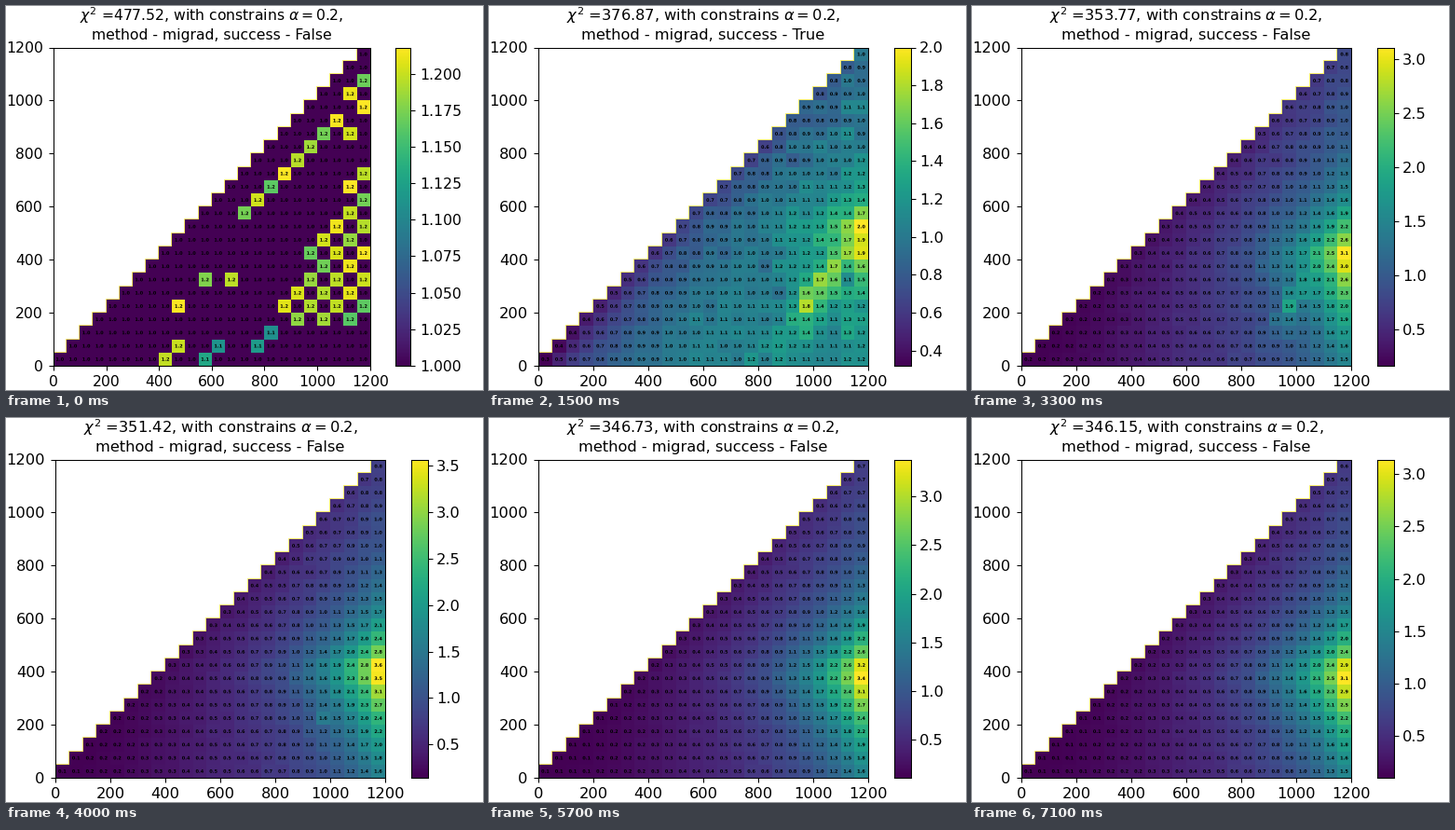
Write a matplotlib script that moves like this. It is 512x412 px and loops after 7.2 s.

```python
import numpy as np
import matplotlib.pyplot as plt
from matplotlib.animation import FuncAnimation
from matplotlib.collections import PathCollection
from matplotlib.textpath import TextPath
from matplotlib.ticker import MaxNLocator
from matplotlib.transforms import Affine2D, IdentityTransform

W, H, DPI = 512, 412, 100
FRAMES, INTERVAL = 72, 100
N, BIN = 24, 50
TOP, BOTTOM = 44.5, 386
RAMP = 15  # frames until the flat start has turned into a smooth fit

plt.rcParams["font.family"] = "DejaVu Sans"

# Key points of the fit; values between them are interpolated.
KEYS = [0, 15, 22, 33, 40, 57, 71]
CHI2 = [477.52, 376.87, 365.75, 353.77, 351.42, 346.73, 346.15]
PEAK = [2.0, 2.0, 2.465, 3.11, 3.57, 3.38, 3.14]
CHI2_FLOOR = 345

J, I = np.mgrid[0:N, 0:N]
INSIDE = J <= I
U = I / (N - 1)
RNG = np.random.default_rng(4)
NOISE = RNG.normal(size=(N, N)) * U


def start_field():
    """Flat field with a raised checker patch, a diagonal band and strays."""
    odd = (I + J) % 2 == 1
    patch = odd & (J > 2) & (I > 16.6 + .6 * np.abs(J - 4.5))
    band = ((I - J == 3) & (I > 13) & (I < 22)) | ((I - J == 2) & (I > 21))
    raised = patch | band
    for i, j in [(8, 0), (11, 0), (9, 1), (12, 1), (15, 1), (16, 2),
                 (9, 4), (11, 6), (13, 6), (22, 17), (23, 19)]:
        raised[j, i] = True
    height = .18 + RNG.uniform(-.02, .04, (N, N)) - .08 * ((J < 3) & (I > 10))
    return 1 + raised * height


def fit_field(n):
    """Slope away from the diagonal, a peak at the right, a fading ridge."""
    t = n - RAMP
    lo = .093 + .227 * np.exp(-t / 16)
    hi = np.interp(n, KEYS, PEAK)
    plateau = 1.08 - .33 * t / 56
    settle = np.exp(-t / 10)

    rise = 1 - np.exp(-(.0525 * I + .175 * np.maximum(I - J, 0)))
    base = lo + (plateau - lo) * rise * U ** (1.3 * (1 - settle))

    size = 3.8 - 1.5 * settle
    dy = J - (7.1 + 2.4 * np.exp(-t / 14))
    dist = N - 1 - I + np.maximum(dy - .5, 0) + np.maximum(-dy - .5, 0) / 1.5
    peak = np.exp(-dist / size)

    off_line = np.abs(J - 4.2 - 1.25 * (I - 19)) / 1.8
    ridge = np.exp(-off_line - np.maximum(19 - I, 0) / 1.3)
    ridge *= .8 / (1 + np.exp((n - 38) / 6))

    field = base + (hi - plateau) * np.maximum(peak, ridge)
    field += (.015 + .055 * np.exp(-t / 20)) * NOISE
    inner = field[INSIDE]
    return lo + (field - inner.min()) * (hi - lo) / np.ptp(inner)


START = start_field()


def field_at(n):
    ease = 1 - (1 - min(n / RAMP, 1)) ** 2
    return (1 - ease) * START + ease * fit_field(max(n, RAMP))


def chi2_at(n):
    logs = np.log(np.array(CHI2) - CHI2_FLOOR)
    return CHI2_FLOOR + np.exp(np.interp(n, KEYS, logs))


def bar_ticks(lo, hi):
    """Round tick values inside the range and the decimals they need."""
    ticks = MaxNLocator(9, steps=[1, 2, 2.5, 5, 10]).tick_values(lo, hi)
    digits = len(f"{ticks[1] - ticks[0]:.4g}") - 2
    inside = (ticks >= lo - 1e-6) & (ticks <= hi + 1e-6)
    return ticks[inside], digits


label_cache = {}


def label_path(text):
    if text not in label_cache:
        path = TextPath((0, 0), text, size=4.9,
                        prop={"family": "DejaVu Sans", "weight": "bold"})
        box = path.get_extents()
        shift = Affine2D().translate(-(box.x0 + box.x1) / 2,
                                     -(box.y0 + box.y1) / 2)
        label_cache[text] = path.transformed(shift)
    return label_cache[text]


def px_box(left, right):
    return [left / W, 1 - BOTTOM / H, (right - left) / W, (BOTTOM - TOP) / H]


def set_layout(digits):
    """Shrink the plot as the bar labels get longer."""
    scale = 1 - .02 * (digits - 1)
    left, right, size = 53 * scale, 407 * scale, 11.7 * scale
    ax.set_position(px_box(left, right))
    cax.set_position(px_box(435 * scale, 452.5 * scale))
    for a in (ax, cax):
        a.tick_params(labelsize=size)
    for text in title:
        text.set_x((left + right) / 2 / W)
        text.set_fontsize(size)


fig = plt.figure(figsize=(W / DPI, H / DPI), dpi=DPI, facecolor="white")
ax = fig.add_axes(px_box(53, 407))
cax = fig.add_axes(px_box(435, 452.5))

edges = np.arange(N + 1) * BIN
mesh = ax.pcolormesh(edges, edges, np.ma.masked_array(START, ~INSIDE),
                     cmap="viridis", zorder=1)
ax.stairs(edges[1:], edges, baseline=None, color="#f2e44a", linewidth=1.2,
          zorder=.5)
ax.set(xlim=(0, N * BIN), ylim=(0, N * BIN),
       xticks=range(0, 1201, 200), yticks=range(0, 1201, 200))

centers = np.column_stack([I[INSIDE], J[INSIDE]]) * BIN + BIN / 2
labels = PathCollection([label_path("1.0")], offsets=centers,
                        offset_transform=ax.transData,
                        facecolors="black", linewidths=0, zorder=2)
labels.set_transform(IdentityTransform())
ax.add_collection(labels, autolim=False)

bar = cax.imshow(np.linspace(0, 1, 256)[:, None], origin="lower",
                 cmap="viridis", aspect="auto", extent=(0, 1, 0, 1))
cax.set_xticks([])
cax.yaxis.tick_right()

for a in (ax, cax):
    a.tick_params(length=3.3, width=.75, pad=3.6)
    a.spines[:].set_linewidth(.75)
ax.tick_params(axis="y", pad=4.8)

title = [fig.text(.5, 1 - y / H, "", ha="center", va="baseline")
         for y in (16.3, 36.3)]


def update(n):
    field = field_at(n)
    values = field[INSIDE]
    lo, hi = values.min(), values.max()

    mesh.set_array(np.ma.masked_array(field, ~INSIDE))
    mesh.set_clim(lo, hi)
    labels.set_paths([label_path(f"{v:.1f}") for v in values])

    ticks, digits = bar_ticks(lo, hi)
    set_layout(digits)
    bar.set_extent((0, 1, lo, hi))
    cax.set_yticks(ticks, [f"{v:.{digits}f}" for v in ticks])
    cax.set_ylim(lo, hi)

    success = abs(n - RAMP) <= 1
    title[0].set_text(rf"$\chi^2$ ={chi2_at(n):.2f}, "
                      r"with constrains $\alpha = 0.2$,")
    title[1].set_text(f"method - migrad, success - {success}")
    return []


anim = FuncAnimation(fig, update, frames=FRAMES, interval=INTERVAL,
                     init_func=lambda: update(0), repeat=True,
                     repeat_delay=0, blit=False)
plt.show()
```
